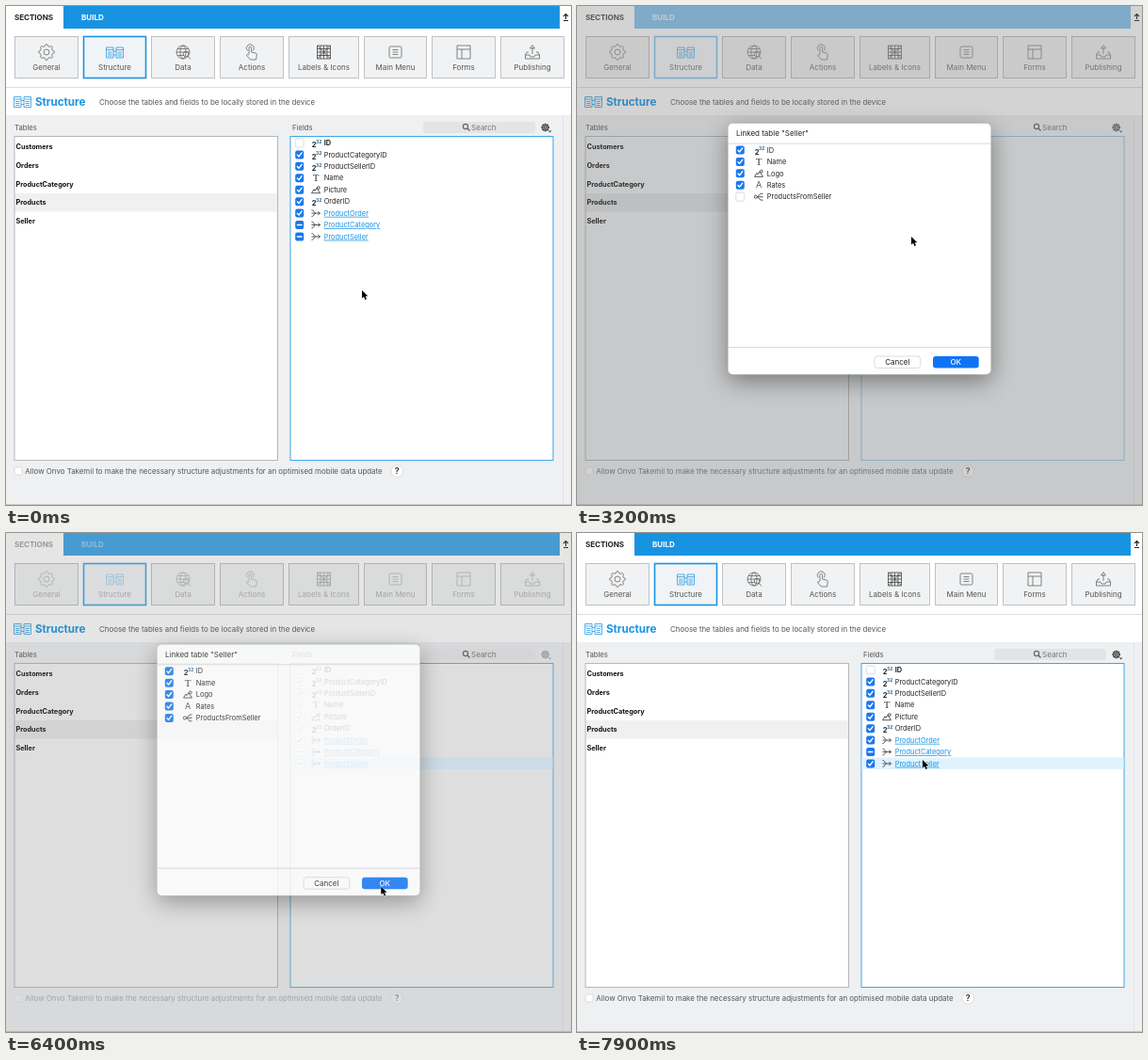
An HTML page that plays this animation: 600x530 px, repeating every 8 s.

```html
<!DOCTYPE html>
<html lang="en">
<head>
<meta charset="utf-8">
<title>Structure editor</title>
<style>
  html, body { margin: 0; width: 100%; height: 100%; overflow: hidden; background: #fff; }
  svg { display: block; width: 600px; height: 530px; font-family: Inter, "Open Sans", sans-serif; }
  text { white-space: pre; }
  .line { fill: none; stroke: #666; stroke-width: .8; }
  .blue { stroke: #2a9be2; }
  .dark .line { stroke: #444; stroke-width: .9; }
  .box rect { fill: #1a78ee; }
  .box path { fill: none; stroke: #fff; stroke-width: 1.4; stroke-linecap: round; stroke-linejoin: round; }
  .box.off rect, .idle .box rect { fill: #fff; stroke: #cfcfcf; stroke-width: .7; }
  .idle .box path { stroke: #888; stroke-width: 1; }
  .soft { opacity: var(--soft); }
  .pale { opacity: var(--pale); }
  .panel { fill-opacity: var(--panel); }
  .sheet { filter: drop-shadow(0 7px 12px rgba(0, 0, 0, .4)); }
</style>
</head>
<body>
<svg id="stage" viewBox="0 0 600 530"></svg>
<script>
const BLUE = '#1893e2';
const rect = (x, y, w, h, fill, more = '') =>
  `<rect x="${x}" y="${y}" width="${w}" height="${h}" fill="${fill}" ${more}/>`;
const text = (x, y, str, size, fill = '#222', more = '') =>
  `<text x="${x}" y="${y}" font-size="${size}" fill="${fill}" ${more}>${str}</text>`;
const line = (d, more = 'class="line"') => `<path d="${d}" ${more}/>`;
const group = (body, attrs) => `<g ${attrs}>${body}</g>`;
const at = (x, y, body) => group(body, `transform="translate(${x} ${y})"`);
const MIDDLE = 'text-anchor="middle"', BOLD = 'font-weight="700"';

const marks = { on: 'M-2.3 .2L-.7 2L2.4-2.1', mixed: 'M-2.3 0H2.3', off: '' };
const checkbox = (x, y, state, id = '') =>
  at(x, y, group(rect(-4.5, -4.5, 9, 9, '', 'rx="2"') + line(marks[state], ''),
    `class="box ${state}" ${id && `id="${id}"`}`));
function setCheckbox(id, state) {
  const box = el(id);
  box.setAttribute('class', 'box ' + state);
  box.lastChild.setAttribute('d', marks[state]);
}

function gear(radius) {
  let points = '';
  for (let i = 0; i < 32; i++) {
    const r = i % 4 < 2 ? radius : radius * .78, a = (i - .5) * Math.PI / 16;
    points += `${(r * Math.cos(a)).toFixed(2)},${(r * Math.sin(a)).toFixed(2)} `;
  }
  return `<polygon points="${points}"/><circle r="${radius * .36}"/>`;
}

// Toolbar icons, each centred on 0,0
const sheetIcon = x => `M${x} -5h7.5v11h-7.5zM${x} -2.5h7.5M${x + 1.5} 0h4.5M${x + 1.5} 2h4.5M${x + 1.5} 4h4.5`;
const tablesIcon = line(sheetIcon(-9) + sheetIcon(1.5) + 'M-1.5 -1h3M-1.5 3h3', 'class="line blue"');
const icons = {
  General: group(gear(8.3), 'class="line"'),
  Structure: tablesIcon,
  Data: group('<circle r="7"/><ellipse rx="3" ry="7"/><circle cx="3" cy="2" r="2.8"/>' +
    line('M-7 0H7M-6-3.5H6M-6 3.5H1M5 4L8 7.5'), 'class="line"'),
  Actions: line('M-3 2V-4.5a1.3 1.3 0 0 1 2.6 0V0l4.5 1q1.4.4 1.2 2L4.5 8H-1.5L-5.5 3.5q0-2 2.5-.5M-4.7-1.6A4 4 0 1 1 1.3-1.6'),
  'Labels &amp; Icons': line('M-7-7H7V7H-7zM-7-7L7 7M7-7L-7 7M-3.5-7V7M0-7V7M3.5-7V7M-7-3.5H7M-7 0H7M-7 3.5H7', 'class="line" style="stroke:#444"'),
  'Main Menu': line('M-5-6H5q1.5 0 1.5 1.5V4.5Q6.5 6 5 6H-5q-1.5 0-1.5-1.5V-4.5Q-6.5-6-5-6zM-3-2.5H3M-3 0H3M-3 2.5H3'),
  Forms: line('M-7-7H7V7H-7zM-7-3H7M-2-3V7'),
  Publishing: line('M-4 0H-6L-7.5 3V7H7.5V3L6 0H4M-7.5 3H-3L-2 5H2L3 3H7.5M0 2V-5M-2.5-4L0-7.5L2.5-4z'),
};
const buttons = [[9, 68], [82, 67], [154, 68], [227, 68], [300, 75], [380, 67], [452, 68], [525, 68]];

const types = {
  num: text(-4.3, 4.6, '2', 7.5, '#222', BOLD) + text(.1, .4, '32', 4.8, '#1b5c90', BOLD),
  text: text(0, 3.6, 'T', 11, '#333', MIDDLE + ' font-family="Liberation Serif, serif"'),
  alpha: text(0, 3.2, 'A', 9, '#555', MIDDLE),
  pic: line('M-4.5 3.5H4.5L1-2L-1 1L-2-.5z') + '<circle class="line" cx="2.8" cy="-2.2" r="1.4"/>',
  toOne: line('M-4.5-3.4H-3.5L-.5 0H4.5M-4.5 3.4H-3.5L-.5 0M-4.5 0H-.5M2.3-1.8L4.5 0L2.3 1.8'),
  toMany: line('M-1.5 0H4.5M-1.5 0L2-3.4H4.5M-1.5 0L2 3.4H4.5') + '<circle class="line" cx="-3.2" r="1.6"/>',
};
const fields = [
  ['ID', 'num', 'off'], ['ProductCategoryID', 'num', 'on'], ['ProductSellerID', 'num', 'on'],
  ['Name', 'text', 'on'], ['Picture', 'pic', 'on'], ['OrderID', 'num', 'on'],
  ['ProductOrder', 'toOne', 'on'], ['ProductCategory', 'toOne', 'mixed'],
  ['ProductSeller', 'toOne', 'mixed', 'sellerBox'],
];
const linkedFields = [
  ['ID', 'num', 'on'], ['Name', 'text', 'on'], ['Logo', 'pic', 'on'],
  ['Rates', 'alpha', 'on'], ['ProductsFromSeller', 'toMany', 'off', 'linkBox'],
];
const fieldRows = (rows, boxX, iconX, textX, top) => group(rows.map(([name, type, state, id], i) => {
  const y = top + i * 12.43, link = type === 'toOne';
  const style = link ? 'text-decoration="underline"' : rows === fields && !i ? BOLD : '';
  return checkbox(boxX, y, state, id) + at(iconX, y, types[type]) +
    text(textX, y + 2.7, name, 7.4, link ? BLUE : '#222', style);
}).join(''), 'class="dark"');

const magnifier = '<circle cx="488" cy="128" r="2.6" class="line" style="stroke-width:1.2"/>' +
  line('M490 130L492.5 132.5', 'class="line" style="stroke-width:1.4"');

const page =
  rect(0, 0, 600, 530, '#fff') + rect(0, 117, 600, 413, '#eff0f2') +
  rect(61, 0, 527, 24, BLUE, 'class="pale"') +
  text(9, 15, 'SECTIONS', 8, '#222', BOLD + ' class="soft"') + text(80, 15, 'BUILD', 8, '#fff', BOLD + ' class="soft"') +
  line('M594.5 14V8.5M592 11L594.5 8.5L597 11M592 15.5H597', 'fill="none" stroke="#222" stroke-width="1.1"') +
  Object.keys(icons).map((name, i) => {
    const [x, w] = buttons[i], active = i === 1;
    return rect(x + .5, 32.5, w - 1, 44, active ? '#f0f4f7' : '#f1f2f3',
        active ? `class="pale" stroke="${BLUE}" stroke-width="1.6"` : 'stroke="#b9bbbd" stroke-width=".9"') +
      group(at(x + w / 2, 49, icons[name]) + text(x + w / 2, 68.3, name, 8, '#555', MIDDLE), 'class="soft"');
  }).join('') +
  rect(0, 86, 600, 1, '#dcdddf') + rect(0, 116.5, 600, .7, '#e2e3e5') +
  at(17.5, 101.5, tablesIcon) + text(31, 106, 'Structure', 11.6, BLUE, BOLD) +
  text(99, 105, 'Choose the tables and fields to be locally stored in the device', 7.9, '#555') +
  text(9, 132, 'Tables', 7.7, '#555') + text(304, 132, 'Fields', 7.7, '#555') +
  rect(443, 123, 119, 12, '#e3e4e6', 'rx="3" class="panel"') + magnifier + text(494, 131.7, 'Search', 8, '#777') +
  group(at(572.7, 129, group(gear(3.7), 'fill="none" stroke="#444" stroke-width="1.3"')) +
    line('M575.8 132.5h3.6l-1.8 2z', 'fill="#444"'), 'class="soft"') +
  rect(9, 138.5, 279.5, 344, '#fff', 'class="panel" stroke="#b5b7b9"') +
  rect(9.5, 199, 278.5, 19.5, '#000', 'opacity=".06"') +
  ['Customers', 'Orders', 'ProductCategory', 'Products', 'Seller']
    .map((name, i) => text(10.5, 151.7 + i * 19.9, name, 7.3, '#111', BOLD)).join('') +
  rect(302, 138.5, 279, 344, '#fff', 'class="panel"') +
  rect(302, 138.5, 279, 344, 'none', 'class="pale" stroke="#3ba6e4"') +
  rect(302.5, 238.5, 278, 12.5, '#e0f3fd', 'id="selected"') +
  fieldRows(fields, 311.7, 329, 337.7, 145.5) +
  group(rect(9, 490, 8, 8, '#fff', 'rx="1.5" stroke="#cfcfcf" stroke-width=".7"') +
    text(20.3, 496.8, 'Allow Onvo Takemil to make the necessary structure adjustments for an optimised mobile data update', 7.9, '#555') +
    '<circle cx="415.3" cy="494" r="6.3" fill="#fff" stroke="#d2d2d2" stroke-width=".7"/>' +
    text(415.3, 497.3, '?', 9, '#222', MIDDLE + ' font-weight="600"'), 'class="soft"') +
  rect(591, 117, 1, 413, '#e2e3e5') + rect(0, 529, 600, 1, '#c4c5c7');

const dialog =
  rect(160.3, 124.5, 279.4, 267, '#fff', 'rx="5" class="sheet" stroke="#000" stroke-opacity=".18" stroke-width=".6"') +
  text(169, 138, 'Linked table "Seller"', 8) +
  rect(160.5, 145.7, 279, .8, '#d0d0d0') + rect(160.5, 362, 279, .8, '#d0d0d0') +
  fieldRows(linkedFields, 173.3, 193, 201.8, 153) +
  rect(316, 372, 48.7, 12.5, '#fff', 'rx="3" stroke="#cfcfcf" stroke-width=".7"') +
  text(340.3, 381, 'Cancel', 8, '#222', MIDDLE) +
  rect(378, 372, 48.7, 12.5, '#0f74f4', 'rx="3"') +
  text(402.3, 381, 'OK', 8, '#fff', MIDDLE + ' font-weight="500"');

const tooltip =
  rect(354.5, 257.5, 136.5, 17, '#f6f6f6', 'stroke="#c8c8c8" stroke-width=".7" style="filter:drop-shadow(0 1px 2px rgba(0,0,0,.35))"') +
  text(356, 264.3, 'N - 1 relation to "Seller"', 6.85) +
  text(356, 272.6, '- Click here to select the published fields', 6.85);

const stage = document.getElementById('stage');
stage.innerHTML =
  group(page, 'id="pageLayer"') + rect(0, 0, 600, 530, '#6e6e6e', 'id="dim"') +
  group(dialog, 'id="dialogLayer"') + group(tooltip, 'id="tooltipLayer"') +
  line('M0 0V8.6L2 6.8L3.4 10L5 9.3L3.6 6.2H6.3z', 'id="cursor" stroke="#fff" stroke-width=".9" paint-order="stroke"');

const el = id => document.getElementById(id);
const show = (id, visible) => { el(id).style.display = visible ? '' : 'none'; };

// time, x, y of the pointer
const path = [
  [0, 378, 302], [900, 362, 229], [1800, 359, 227], [2400, 355, 245], [3950, 355, 245],
  [4700, 174, 202], [5050, 174, 202], [5600, 399, 358], [5900, 398.3, 375.5],
  [7000, 398.3, 375.5], [7700, 370, 269], [7900, 367, 241],
];
function pointer(t) {
  const next = path.findIndex(p => p[0] > t);
  if (next < 0) return path[path.length - 1].slice(1);
  const [t0, x0, y0] = path[next - 1], [t1, x1, y1] = path[next];
  const u = (t - t0) / (t1 - t0), k = u * u * (3 - 2 * u);
  return [x0 + (x1 - x0) * k, y0 + (y1 - y0) * k];
}

function draw(now) {
  const t = Math.floor(now % 8000 / 100) * 100;
  // The sheet lifts and fades over two steps as it closes
  const open = t >= 3200 && t < 6600, idle = open && t >= 3300;
  const step = t < 6400 ? 0 : t < 6500 ? 1 : 2;
  const shade = open ? [1, .6, .3][step] : 0;
  show('dialogLayer', open);
  el('dialogLayer').setAttribute('opacity', [1, .82, .25][step]);
  el('dialogLayer').setAttribute('transform', `translate(0 ${[0, -6.3, -18.5][step]})`);
  el('dim').setAttribute('opacity', .3 * shade);
  stage.style.setProperty('--pale', 1 - .48 * shade * shade);
  stage.style.setProperty('--panel', 1 - shade);
  stage.style.setProperty('--soft', idle ? .42 : open ? .8 : 1);
  el('pageLayer').setAttribute('class', idle ? 'idle' : '');
  show('selected', t >= 3300);
  show('tooltipLayer', t >= 2600 && t < 3200);
  setCheckbox('linkBox', t >= 4800 ? 'on' : 'off');
  setCheckbox('sellerBox', t >= 6600 ? 'on' : 'mixed');
  el('cursor').setAttribute('transform', `translate(${pointer(t)})`);
  requestAnimationFrame(() => draw(performance.now()));
}
draw(performance.now());
</script>
</body>
</html>
```
